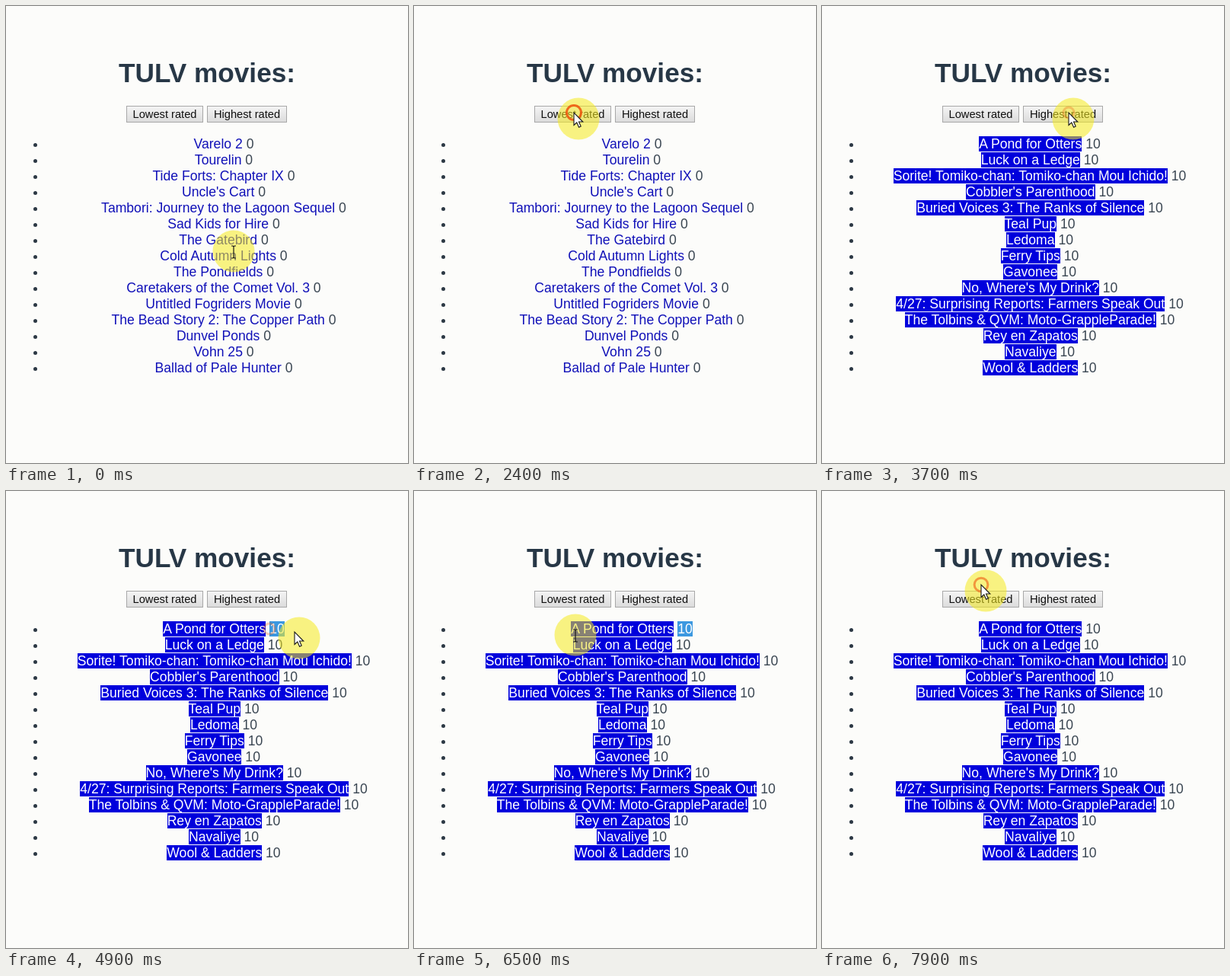
Animation, 528 px wide and 600 px high, one loop 8 s. Source, as an HTML page:

```html
<!DOCTYPE html>
<html lang="en">
<head>
<meta charset="utf-8">
<title>Movie ratings</title>
<style>
  html, body { margin: 0; width: 528px; height: 600px; overflow: hidden; }
  body {
    position: relative; background: #fcfcfa; color: #3a4652; cursor: default;
    font: 17.6px "Liberation Sans", Arial, sans-serif;
  }
  h1 {
    position: absolute; left: 0; top: 68px; width: 528px; margin: 0;
    font-size: 35.2px; line-height: 40px; text-align: center; color: #273746;
  }
  .btn {
    position: absolute; top: 131px; height: 22px; box-sizing: border-box;
    border: 1px solid #a8a8a8; background: linear-gradient(#f4f4f4, #dcdcdc);
    color: #101010; font-size: 14.667px; line-height: 20px; text-align: center;
  }
  ul {
    position: absolute; left: 53px; top: 171px; width: 466px;
    margin: 0; padding: 0; list-style: none; text-align: center;
  }
  li { position: relative; height: 21px; line-height: 21px; white-space: nowrap; }
  li::before {
    content: ""; position: absolute; left: -17px; top: 9px;
    width: 5px; height: 5px; border-radius: 50%; background: #2c3844;
  }
  .title { color: #1010b8; }
  .high .title { color: #fff; background: #0000dc; }
  .picked { color: #fff; background: #3c98e0; }
  svg { position: absolute; left: 0; top: 0; }
</style>
</head>
<body>
<h1>TULV movies:</h1>
<div class="btn" style="left:158px;width:101px">Lowest rated</div>
<div class="btn" style="left:264px;width:105px">Highest rated</div>
<ul id="low"></ul>
<ul id="high" class="high"></ul>
<svg width="528" height="600">
  <circle id="glow" r="27.5" fill="#f6ec20" fill-opacity=".55"/>
  <circle id="ring" fill="none" stroke="#ee5a10" stroke-width="3"/>
  <path id="arrow" d="M0 0V16.5L3.8 13L6.6 19.2L9.2 18L6.5 12H11.8Z"
        fill="#fff" stroke="#181818" stroke-width="1.1"/>
  <path id="beam" d="M-3 -8H-1L0 -7L1 -8H3M0 -7V7M-3 8H-1L0 7L1 8H3"
        fill="none" stroke="#181818" stroke-width="1.2"/>
</svg>
<script>
const LOOP = 8000, STEP = 100;
const SWAP = 3600, PICK = 4800, UNPICK = 7800;
const CLICKS = [2400, 3500, 4700, 7800];

const LOW = [
  "Varelo 2", "Tourelin", "Tide Forts: Chapter IX", "Uncle's Cart",
  "Tambori: Journey to the Lagoon Sequel", "Sad Kids for Hire", "The Gatebird",
  "Cold Autumn Lights", "The Pondfields", "Caretakers of the Comet Vol. 3",
  "Untitled Fogriders Movie", "The Bead Story 2: The Copper Path",
  "Dunvel Ponds", "Vohn 25", "Ballad of Pale Hunter"
];
const HIGH = [
  "A Pond for Otters", "Luck on a Ledge",
  "Sorite! Tomiko-chan: Tomiko-chan Mou Ichido!", "Cobbler's Parenthood",
  "Buried Voices 3: The Ranks of Silence", "Teal Pup", "Ledoma", "Ferry Tips",
  "Gavonee", "No, Where's My Drink?",
  "4/27: Surprising Reports: Farmers Speak Out",
  "The Tolbins & QVM: Moto-GrappleParade!", "Rey en Zapatos", "Navaliye",
  "Wool & Ladders"
];

// Pointer path: [ms, x, y] of the glow centre
const PATH = [
  [0, 299, 322], [400, 308, 340], [900, 245, 280], [1400, 209, 174],
  [1800, 216, 148], [2800, 216, 148], [3400, 330, 148], [3900, 330, 148],
  [4600, 352, 189], [4700, 352, 189], [4900, 385, 193], [5300, 425, 188],
  [5700, 340, 189], [6500, 212, 189], [6700, 212, 189], [7100, 440, 188],
  [7500, 325, 182], [7800, 215, 131], [8000, 215, 131]
];

const $ = id => document.getElementById(id);
const low = $("low"), high = $("high"), glow = $("glow"), ring = $("ring");
const arrow = $("arrow"), beam = $("beam");

function fill(list, titles, score) {
  for (const text of titles) {
    const row = document.createElement("li");
    const title = document.createElement("span");
    const num = document.createElement("span");
    title.className = "title";
    title.textContent = text;
    num.textContent = score;
    row.append(title, " ", num);
    list.append(row);
  }
}
fill(low, LOW, 0);
fill(high, HIGH, 10);
const firstScore = high.firstElementChild.lastElementChild;

function pointer(t) {
  let i = 1;
  while (i < PATH.length - 1 && t > PATH[i][0]) i++;
  const [t0, x0, y0] = PATH[i - 1], [t1, x1, y1] = PATH[i];
  const u = (t - t0) / (t1 - t0), k = u * u * (3 - 2 * u);
  return [x0 + (x1 - x0) * k, y0 + (y1 - y0) * k];
}

function overText(list, x, y) {
  const row = list.children[Math.floor((y - 171) / 21)];
  if (!row) return false;
  const from = row.firstElementChild.getBoundingClientRect().left;
  const to = row.lastElementChild.getBoundingClientRect().right;
  return x >= from && x <= to;
}

const show = (el, on) => { el.style.visibility = on ? "visible" : "hidden"; };
const move = (el, x, y) => el.setAttribute("transform", `translate(${x} ${y})`);

function draw(t) {
  const swapped = t >= SWAP;
  show(low, !swapped);
  show(high, swapped);
  firstScore.className = t >= PICK && t < UNPICK ? "picked" : "";

  const [x, y] = pointer(t);
  const text = overText(swapped ? high : low, x, y);
  move(glow, x, y);
  move(arrow, x - 6, y - 8);
  move(beam, x, y + 1);
  show(arrow, !text);
  show(beam, text);

  const click = CLICKS.find(c => t >= c && t < c + 300);
  show(ring, click !== undefined);
  if (click !== undefined) {
    const age = (t - click) / 200;
    const [cx, cy] = pointer(click);
    move(ring, cx - 6, cy - 8);
    ring.setAttribute("r", 9.5 - 2.5 * age * age);
    ring.setAttribute("stroke-opacity", 0.9 - 0.6 * age);
  }
}

const start = performance.now();
function tick() {
  const t = (performance.now() - start) % LOOP;
  draw(Math.floor(t / STEP) * STEP);
  requestAnimationFrame(tick);
}
tick();
</script>
</body>
</html>
```
